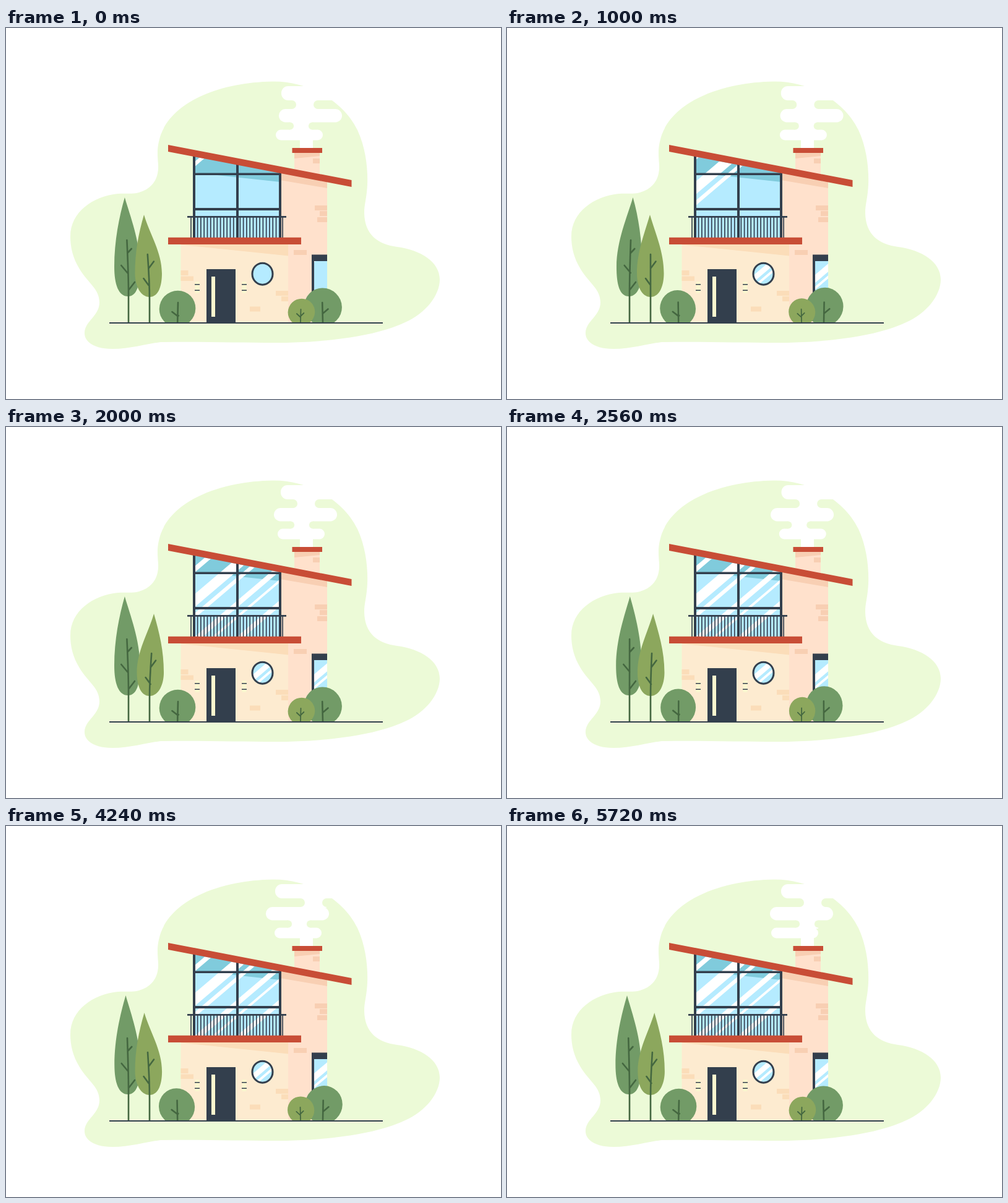
An HTML page that plays this animation: 800x600 px, repeating every 5.76 s.

```html
<!DOCTYPE html>
<html lang="en">
<head>
<meta charset="utf-8">
<title>House</title>
<style>
html, body { margin: 0; width: 100%; height: 100%; overflow: hidden; background: #fff; }
svg { display: block; width: 800px; height: 600px; }
.dark { fill: #333f4d; }
.red { fill: #c84d36; }
.front { fill: #fdebd0; }
.frontShade { fill: #fbddb9; }
.side { fill: #ffe1cc; }
.sideShade { fill: #f8cfb3; }
.glass { fill: #b5ebff; }
.lamp { fill: #fbf7cf; }
.green { fill: #729b67; }
.olive { fill: #8ca75d; }
.twig { fill: none; stroke: #446740; stroke-width: 2.6; stroke-linecap: round; }
</style>
</head>
<body>
<svg viewBox="0 0 800 600">
  <defs>
    <clipPath id="bigClip"><path d="M304 208L443 235V339H304Z"/></clipPath>
    <clipPath id="roundClip"><ellipse cx="414.5" cy="397.7" rx="16" ry="17"/></clipPath>
    <clipPath id="sideClip"><path d="M498 377H519V430H498Z"/></clipPath>
    <clipPath id="ground"><path d="M0 0H800V476.5H0Z"/></clipPath>
  </defs>

  <path fill="#ecfad7" d="M431 86.5C490 86 545 118 568 165C582 195 585 230 584 253C583 275 579 285 579 298
    C579 335 602 350 632 354C670 359 701 378 701 407C701 432 678 462 645 476C595 500 510 509 435 509
    C380 509 320 507 250 508C225 511 200 519 172 519C145 519 126 509 127 492C128 474 151 465 151 444
    C151 422 133 413 119 390C108 372 104 355 104 337C104 298 140 272 181 268C195 267 204 269 215 266
    C236 260 247 244 246 222C245 205 243 195 250 173C268 122 340 88 431 86.5Z"/>

  <g fill="#fff">
    <path d="M475 178H496V196H475Z"/>
    <rect id="puff0" y="94" width="140" height="23" rx="11"/>
    <rect id="puff1" y="131" width="102" height="21.5" rx="10.7"/>
    <rect id="puff2" y="164.5" width="76" height="17" rx="8.5"/>
    <g id="neck0"><path d="M-7 116H35V132H-7Z"/><g fill="#ecfad7"><circle cx="-7" cy="124" r="7"/><circle cx="35" cy="124" r="7"/></g></g>
    <g id="neck1"><path d="M-6 151H30V166H-6Z"/><g fill="#ecfad7"><circle cx="-6" cy="158.5" r="6.1"/><circle cx="30" cy="158.5" r="6.1"/></g></g>
  </g>

  <!-- walls and chimney -->
  <path class="side" d="M466 202H507V245H466ZM443 232L519 247V476H443Z"/>
  <path class="sideShade" d="M466 202H507V207L466 211ZM443 232L519 247V259L443 246Z
    M496 211h11v8h-11zM499 287h20v8h-20zM507 296h12v8h-12zM503 306h16v8h-16zM465 359h21v8h-21z"/>
  <path class="front" d="M282.5 348H456V476H282.5Z"/>
  <path class="frontShade" d="M282.5 348H456V368.5L282.5 350.5Z
    M282.5 392h12v8h-12zM282.5 401.5h20.500v7.500h-20.500zM436 425h20v8h-20zM445 434h11v8h-11zM394 450.500h17v8h-17z"/>
  <path class="red" d="M462.500 194H511V202H462.500Z"/>

  <!-- large window -->
  <path class="glass" d="M304 205L443 232V339H304Z"/>
  <path fill="#80cbdc" d="M304 205L443 232V249L304 234Z"/>
  <g clip-path="url(#bigClip)" fill="#fff"><path id="slide"/><path id="grow"/></g>
  <path class="dark" d="M302 200H306V339H302ZM372 215H376V339H372ZM441 230H445V339H441Z
    M302 234.500H445V238H302ZM302 291H445V295H302ZM293 304H453V306.800H293Z"/>
  <path id="bars" stroke="#333f4d" stroke-width="1.700"/>
  <path class="red" d="M262 189L558.500 246V257L262 200ZM262 338.700H477V350H262Z"/>

  <!-- small windows -->
  <ellipse class="glass" cx="414.500" cy="397.700" rx="16.500" ry="17.500"/>
  <g clip-path="url(#roundClip)"><path id="roundGlare" fill="#fff"/></g>
  <ellipse cx="414.500" cy="397.700" rx="16.500" ry="17.500" fill="none" stroke="#333f4d" stroke-width="3"/>
  <path class="glass" d="M498 377H519V430H498Z"/>
  <g clip-path="url(#sideClip)"><path id="sideGlare" fill="#fff"/></g>
  <path class="dark" d="M494 366.500H519V377H498V430H494Z"/>

  <!-- door and lamps -->
  <path class="dark" d="M324 390H371V476H324Z"/>
  <path class="lamp" d="M332 402H338V467H332ZM305.500 410h7v19h-7zM381.500 410h7v19h-7z"/>
  <path class="dark" d="M305 414h8v1.500h-8zM305 423.500h8v1.500h-8zM381 414h8v1.500h-8zM381 423.500h8v1.500h-8z"/>

  <path id="crown0" class="green"/><path id="stem0" class="twig"/>
  <path id="crown1" class="olive"/><path id="stem1" class="twig"/>

  <g clip-path="url(#ground)">
    <g id="bush0"><circle class="green" cy="-22" r="29.300"/><path class="twig" d="M.7 0V-32M.7-10L-8.500-17M.7-9L2-11"/></g>
    <g id="bush1"><circle class="green" cy="-25" r="30.500"/><path class="twig" d="M-1 0V-32M-1-14L8-21.500"/></g>
    <g id="bush2"><circle class="olive" cy="-16.500" r="21.800"/><path class="twig" style="stroke-width:1.800" d="M-1 0V-21M-1-8L-7.500-14M-1-10L4-15"/></g>
  </g>
  <path class="dark" d="M167 476H609V478H167Z"/>
</svg>
<script>
const el = id => document.getElementById(id);
const set = (id, name, value) => el(id).setAttribute(name, value);
const clamp = v => Math.max(0, Math.min(1, v));
const smooth = v => v * v * (3 - 2 * v);
const easeOut = v => 1 - (1 - v) ** 3;

// Smooth curve through values at the given times (seconds).
const times = [0, .64, 1.36, 2, 3.16, 4.24, 4.8, 5.72];
function curve(v, t) {
  const last = times.length - 1;
  const slope = i => {
    const a = Math.max(0, i - 1), b = Math.min(last, i + 1);
    return (v[b] - v[a]) / (times[b] - times[a]);
  };
  let i = 0;
  while (i < last - 1 && t > times[i + 1]) i++;
  const h = times[i + 1] - times[i], u = clamp((t - times[i]) / h);
  return v[i] + (v[i + 1] - v[i]) * smooth(u)
    + h * u * (1 - u) * ((1 - u) * slope(i) - u * slope(i + 1));
}

const puffs = [
  [445, 443, 443, 444, 442, 435, 435, 443],
  [441, 443, 439, 433, 420, 420, 421, 425],
  [436, 441, 440, 439, 440, 434, 430, 427]
];
const necks = [
  [469, 467, 470, 471, 476, 483, 483.5, 480],
  [465, 472, 470, 466, 456, 462, 466, 473]
];
const sway = [1, -.2, -.85, 1, -.9, -.85, -.3, 1];

// Slanted light band between x = a and x = b; top and bottom are heights at x = left.
const band = (left, a, b, top, bottom) => {
  const y = (c, x) => c - .85 * (x - left);
  return `M${a} ${y(top, a)}L${b} ${y(top, b)}V${y(bottom, b)}L${a} ${y(bottom, a)}Z`;
};

set('slide', 'd', band(304, 300, 450, 226, 236) + band(304, 300, 450, 271, 292) + band(304, 300, 450, 302, 310));
set('roundGlare', 'd', band(397, 390, 435, 402, 413) + band(397, 390, 435, 419, 424));
set('sideGlare', 'd', band(498, 490, 525, 400, 413) + band(498, 490, 525, 419, 424));
set('bars', 'd', Array.from({ length: 29 }, (_, i) => `M${299 + i * 5.29} 306V339`).join(''));

function crown(id, tip, top, left, right, mid, base, bottom, lean) {
  const l = left + lean, r = right + lean, low = bottom - 19, high = top + (mid - top) * .63;
  set(id, 'd', `M${tip} ${top}C${tip - 9} ${top + 31} ${l} ${high} ${l} ${mid}
    C${l} ${low} ${base - 15} ${bottom} ${base} ${bottom}C${base + 15} ${bottom} ${r} ${low} ${r} ${mid}
    C${r} ${high} ${tip + 9} ${top + 31} ${tip} ${top}Z`);
}

function trees(t) {
  const d = -5.8 * Math.cos(Math.PI * t), x = 198 + .3 * d;
  crown('crown0', 197.7 + d, 274, 176, 217.5, 386, 197, 434, .17 * d);
  set('stem0', 'd', `M198 476V430Q198 400 ${197.7 + .4 * d} 343
    M${x} 364L${x + 6.5} 357M${x} 396L${x - 10} 384M198 424L208 411`);

  const e = -8 * Math.cos(Math.PI * t / 2), z = 232 + .2 * e;
  crown('crown1', 231 + e, 302, 210, 253.5, 397, 232, 435, .19 * e);
  set('stem1', 'd', `M232 476V440Q232 410 ${232 + .4 * e} 366
    M${z} 389L${z + 8.5} 377.5M${z} 416L${z - 8} 405`);
}

function bushes(t) {
  const s = curve(sway, t), lift = Math.max(0, 1 - s * s);
  [[276.5, 1], [513, -1], [477, 1]].forEach(([x, dir], i) =>
    set('bush' + i, 'transform', `translate(${x} 476) skewX(${-1.4 * dir * s}) scale(${1 - .03 * lift} ${1 + .025 * lift})`));
}

function glare(t) {
  const big = 1 - smooth(clamp((t - .4) / .9));
  set('slide', 'transform', `translate(0 ${-85 * big})`);
  const half = 95 * smooth(clamp((t - 1.1) / .62));
  const grown = (top, bottom) => band(304, 385 - half, 385 + half, top, bottom);
  set('grow', 'd', half ? grown(340, 351) + grown(364, 369) + grown(398, 408) : '');
  const small = -45 * (1 - easeOut(clamp((t - .2) / 1.1)));
  set('roundGlare', 'transform', `translate(0 ${small})`);
  set('sideGlare', 'transform', `translate(0 ${small})`);
}

function draw(now) {
  const t = Math.floor(now % 5760 / 40) * .04;
  puffs.forEach((v, i) => set('puff' + i, 'x', curve(v, t)));
  necks.forEach((v, i) => set('neck' + i, 'transform', `translate(${curve(v, t)})`));
  trees(t);
  bushes(t);
  glare(t);
}

const start = performance.now();
function tick() {
  draw(performance.now() - start);
  requestAnimationFrame(tick);
}
tick();
</script>
</body>
</html>
```
